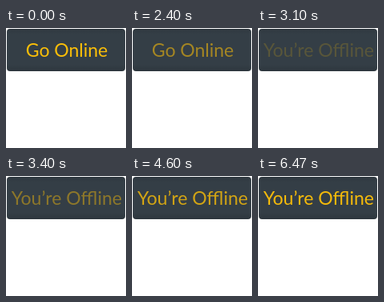
An HTML page with a canvas that plays this animation: 150 px wide and 150 px high, repeating every 8 s.

```html
<!DOCTYPE html>
<html lang="en">
<head>
<meta charset="utf-8">
<title>Status button</title>
<style>
  html, body { margin: 0; width: 100%; height: 100%; overflow: hidden; background: #fff; }
  canvas { display: block; width: 150px; height: 150px; }
</style>
</head>
<body>
<canvas id="stage"></canvas>
<script>
const LOOP = 8000;
const STEP = 0.085;
// The label fades in equal opacity steps that crowd together around the swap.
const FADE_OUT = [0, 500, 1270, 1770, 2140, 2400, 2600, 2770, 2860, 2930];
const FADE_IN = [3000, 3100, 3170, 3270, 3400, 3570, 3800, 4140, 4600, 5270, 6470];

const canvas = document.getElementById('stage');
const ctx = canvas.getContext('2d');
const scale = window.devicePixelRatio || 1;
canvas.width = canvas.height = 150 * scale;
ctx.scale(scale, scale);

const lastStep = (times, t) => times.filter(time => time <= t).length - 1;

function labelAt(t) {
  return t < FADE_IN[0]
    ? { text: 'Go Online', x: 76, alpha: 0.98 - STEP * lastStep(FADE_OUT, t) }
    : { text: 'You’re Offline', x: 75.8, alpha: 0.1 + STEP * lastStep(FADE_IN, t) };
}

function drawButton() {
  const fill = ctx.createLinearGradient(0, 1, 0, 54);
  fill.addColorStop(0, '#2f383f');
  fill.addColorStop(0.12, '#343e46');
  fill.addColorStop(0.85, '#343e46');
  fill.addColorStop(1, '#2d363d');
  ctx.fillStyle = fill;
  ctx.beginPath();
  ctx.roundRect(1, 1, 148, 53, 4);
  ctx.fill();
}

function drawLabel({ text, x, alpha }) {
  ctx.globalAlpha = alpha;
  ctx.fillStyle = '#ffc107';
  ctx.font = '23px Lato, sans-serif';
  ctx.textAlign = 'center';
  ctx.fillText(text, x, 35.7);
  ctx.globalAlpha = 1;
}

function render(now) {
  ctx.fillStyle = '#fff';
  ctx.fillRect(0, 0, 150, 150);
  drawButton();
  drawLabel(labelAt(now % LOOP));
}

const start = performance.now();
function tick() {
  render(performance.now() - start);
  requestAnimationFrame(tick);
}
tick();
</script>
</body>
</html>
```
